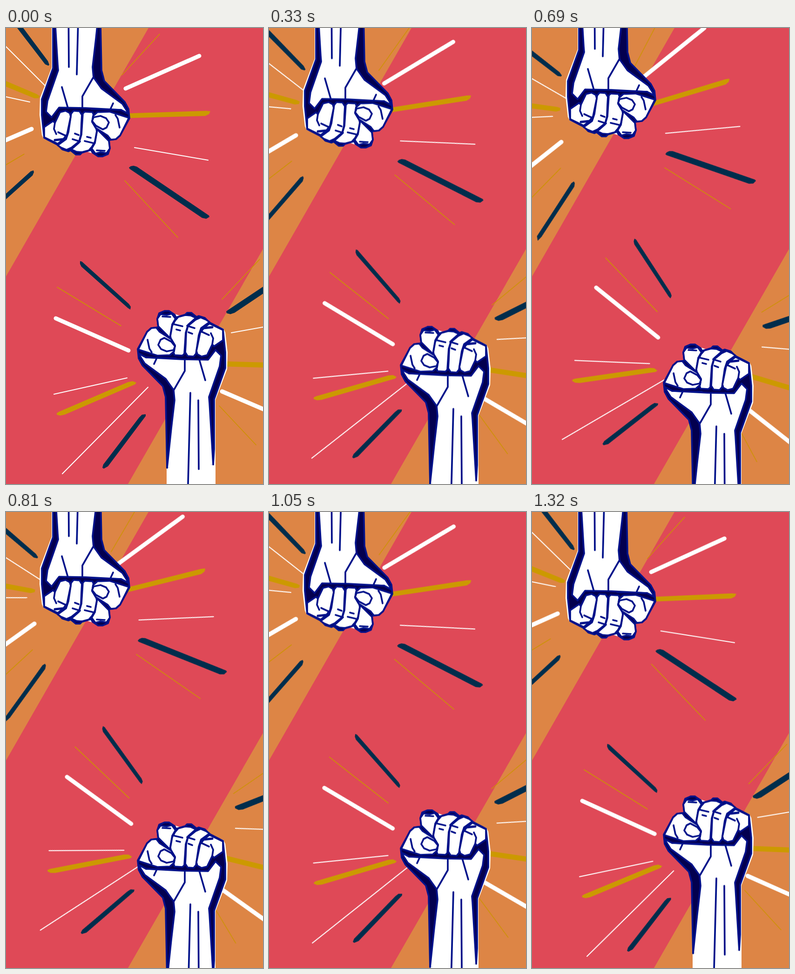
An HTML page without scripts that plays this animation: 552x980 px, repeating every 1350 ms.

```html
<!DOCTYPE html>
<html lang="en">
<head>
<meta charset="utf-8">
<title>Raised fists</title>
<style>
  html, body { margin: 0; width: 100%; height: 100%; overflow: hidden; background: #df4957; }
  svg { display: block; width: 100vw; height: 100vh; }

  .rays, .punch { animation: 1350ms -2ms infinite; }
  .rays { animation-name: swing; }
  .punch { animation-name: slide; }
  .rays.top { --turn: -15deg; transform-origin: 165px 200.5px; }
  .rays.bottom { --turn: 15deg; transform-origin: 373px 708.5px; }
  .punch.top { --shift: -39px; }
  .punch.bottom { --shift: 72px; }

  /* 23 even steps out, 22 even steps back */
  @keyframes swing {
    0% { transform: rotate(0deg); animation-timing-function: steps(23); }
    51.1111% { transform: rotate(var(--turn)); animation-timing-function: steps(22); }
    100% { transform: rotate(0deg); }
  }
  @keyframes slide {
    0% { transform: translateY(0); animation-timing-function: steps(23); }
    51.1111% { transform: translateY(var(--shift)); animation-timing-function: steps(22); }
    100% { transform: translateY(0); }
  }

  .orange { fill: #dd8545; }
  .navy { fill: #002d4c; }
  .gold { fill: #cc9900; }
  .bar, .thin, .hair { fill: none; stroke: #fff; stroke-linecap: round; }
  .bar { stroke-width: 9; }
  .thin { stroke-width: 2; }
  .hair { stroke: #cc9200; stroke-width: 1.6; }

  .ink { stroke: #00118a; stroke-width: 3.7; stroke-linejoin: round; stroke-linecap: round; }
  .shade { fill: #03004f; }
  .skin { fill: #fff; }
  .line { fill: none; }
</style>
</head>
<body>
<svg viewBox="0 0 552 980" preserveAspectRatio="none">
  <defs>
    <g id="fist">
      <path class="skin" d="M364 615L373 618 413 624 467 646 471 654 476 697 475 733 450 799 450 980H345V940L400 700Z"/>
      <g class="ink">
        <path class="shade" d="M346 945L343 793 337 770 293 725 285 710 283 690 303 653 312 645 327 643 325 625 329 613 341 608 350 608 362 616 365 622 385 616 389 612 398 612 409 621 414 619 427 623 437 633 466 648 471 697 471 731 447 798 447 905 445 938"/>
        <path class="skin" d="M346 945L355 860 362 800 360 778 343 754 298 721 284 699 301 708 377 712 434 713 450 692 462 704 459 727 436 793 437 805 445 938"/>
      </g>
      <path class="skin" d="M351 915H440V980H351Z"/>
      <g class="ink">
        <g class="skin">
          <path d="M327 641L325 625 332 615 345 617 356 614 364 625 357 637 352 666Z"/>
          <path d="M353 662L357 640 363 629 370 621 385 617 397 618 408 623 391 638 386 655 383 700 379 704 362 703 360 697 363 683 354 667Z"/>
          <path d="M386 680L387 655 391 640 407 627 418 622 430 627 437 632 419 645 414 660 408 700 403 706 390 705 385 697Z"/>
          <path d="M411 701L409 694 418 650 437 635 466 649 466 671 447 684 443 680 432 703 420 706Z"/>
          <path d="M284 691L303 653 312 645 323 644 330 653 355 669 363 682 361 695 352 703 325 704Z"/>
          <path d="M327 681L332 670 340 666 355 674 363 684 360 692 345 695 333 690Z"/>
        </g>
        <g class="line">
          <path d="M336 620L353 621M362 637L379 641M366 648L374 650M389 640L405 645M392 654L400 657M421 653L436 660M440 656L445 667 443 680"/>
          <path d="M418 653L424 645 443 643" stroke-width="5"/>
          <path d="M304 670L308 689 313 697M324 709L318 722M301 708L365 710"/>
          <path d="M384 714V737L361 777M415 712L428 757M396 784L391 980M413 800L414 948"/>
        </g>
      </g>
    </g>
  </defs>

  <path class="orange" d="M0 0H306L0 534ZM552 475V980H262Z"/>

  <g class="rays top">
    <path class="navy" d="M-45 -90L-35 -95 37 0 90 71 93 79 91 81 84 78 24 0Z"/>
    <path class="gold" d="M-90 76L0 114 66 142 72 146 70 151 61 151 0 126 -90 90Z"/>
    <path class="thin" d="M-80 -40L100 140M-100 126L51 159"/>
    <path class="bar" d="M-100 284L55 217M257 130L415 60"/>
    <path class="hair" d="M-90 347L39 271M249 101L330 13M255 328L369 450"/>
    <path class="navy" d="M-49 409L-48 399 0 356 53 308 59 306 60 310 57 317 0 368 -39 403Z"/>
    <path class="gold" d="M245 184L430 178 439 179 436 185 428 189 245 194Z"/>
    <path class="thin" d="M276 257L434 284"/>
    <path class="navy" d="M264 300L268 297 274 296 281 298 436 403 437 406 430 410 421 408 266 303Z"/>
  </g>

  <g class="rays bottom">
    <path class="navy" d="M159 501L163 502 264 593 268 599 267 605 262 602 162 513 159 507Z"/>
    <path class="hair" stroke-width="2" d="M110 557L247 640M464 583L545 497M458 812L537 896"/>
    <path class="bar" d="M107 624L263 693M464 781L650 861"/>
    <path class="thin" d="M103 787L260 752M121 958L305 772M484 655L640 627"/>
    <path class="gold" d="M109 828L113 825 262 761 272 759 280 762 277 766 126 831 116 833 109 831Z"/>
    <path class="navy" d="M207 945L209 938 286 837 292 831 300 830 300 834 219 942 210 947Z"/>
    <path class="navy" d="M473 609L477 606 552 556 630 505V519L552 571 491 612 482 615 474 613Z"/>
    <path class="gold" d="M455 716L640 721V732L455 727Z"/>
  </g>

  <g class="punch top"><use href="#fist" transform="rotate(180 274 442)"/></g>
  <g class="punch bottom"><use href="#fist"/></g>
</svg>
</body>
</html>
```
